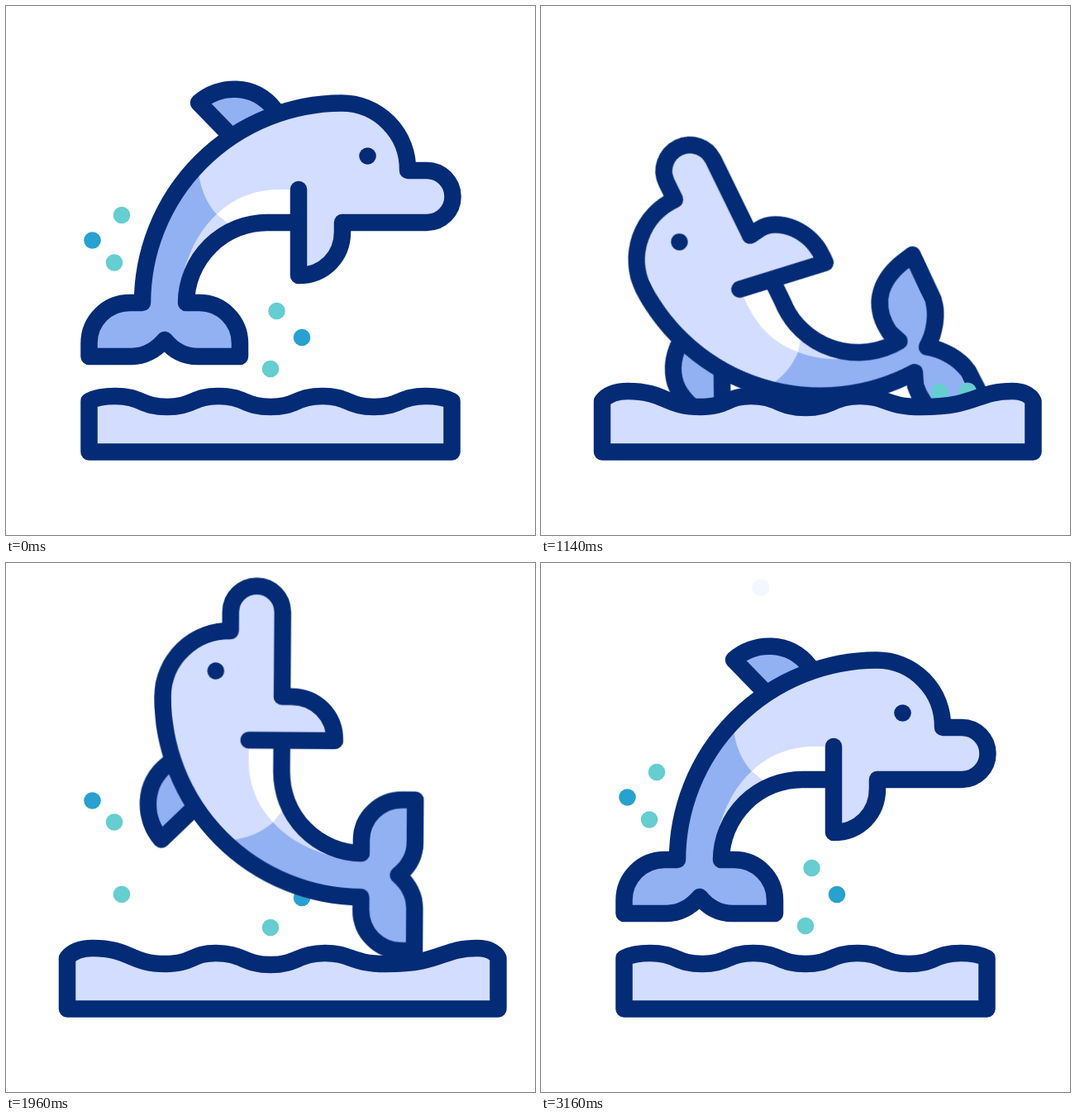
Write an HTML page without scripts that moves like this. It is 640 px wide and 640 px high and loops after 3.6 s.

```html
<!DOCTYPE html>
<html lang="en">
<head>
<meta charset="utf-8">
<title>Leaping dolphin</title>
<style>
html, body { margin: 0; width: 100%; height: 100%; overflow: hidden; background: #fff; }
svg { display: block; width: 100%; height: 100%; }

:root { --navy: #042b76; --pale: #d2ddff; --mid: #92b1f3; --teal: #66cdd1; --blue: #27a1cf; --sun: #ffcb50; }

svg * { animation: 3.6s linear infinite; }
.line { stroke: var(--navy); stroke-width: 20.5; stroke-linecap: round; stroke-linejoin: round; }
.pale { fill: var(--pale); }
.mid { fill: var(--mid); }
.trail { fill: none; stroke: var(--sun); stroke-width: 21; stroke-linecap: round; opacity: 0; }

/* leap: backflip, fall into the water, rock, rise again */
.dolphin { transform-origin: 320px 248.5px; animation-name: leap; }
@keyframes leap {
  0%, 7.78% { transform: none; animation-timing-function: cubic-bezier(.4, 0, .7, 1); }
  14.44% { transform: translate(-13px, -8.5px) rotate(-82.5deg); }
  22.78% { transform: translate(-13px, -4px) rotate(-89deg); animation-timing-function: ease-in; }
  31.67% { transform: translate(-41px, 113px) rotate(-115.6deg); animation-timing-function: ease-out; }
  38.89% { transform: translate(-8px, 140px) rotate(-185deg); animation-timing-function: ease-in-out; }
  47.22% { transform: translate(11.7px, 32.3px) rotate(-138.2deg); }
  54.44% { transform: translate(0, 0) rotate(-89.9deg); animation-timing-function: cubic-bezier(.3, .3, .5, 1); }
  64.44%, 100% { transform: none; }
}

/* fins and tail spread on impact */
.body { animation-name: spread; }
@keyframes spread {
  0%, 22.78%, 47.22%, 100% {
    d: path("M354 262L316 262A98 98 0 0 0 218 359L234 359C261 359 283 381 283 408L283 424L232 424C213 424 200 414 192 404C183 414 171 424 152 424L100.5 424L100.5 408C100.5 381 122 359 150 359L165 359A242 242 0 0 1 406 117.5A80 80 0 0 1 486 199L509 199A31.3 31.3 0 0 1 509 262L407 262");
  }
  31.67% {
    d: path("M354 262L316 262A98 98 0 0 0 213 368L228 362C272 356 292 385 298 418L300 428L240 427C222 424 203 411 192 395C181 411 162 424 144 427L84 428L86 418C92 385 112 356 156 362L171 368A242 242 0 0 1 406 117.5A80 80 0 0 1 486 199L509 199A31.3 31.3 0 0 1 509 262L407 262");
  }
}

.fin { animation-name: fin; }
@keyframes fin {
  0%, 22.78%, 47.22%, 100% { d: path("M354 222L354 326C385 326 407 303 407 273L407 262"); }
  31.67% { d: path("M354 222L337.5 329C383 333 412 300 409 276L407 262"); }
}

.dorsal { animation-name: dorsal; }
@keyframes dorsal {
  0%, 22.78%, 47.22%, 100% { d: path("M270 155L233 117C258 95 300 93 325 125"); }
  31.67% { d: path("M274 159L221 134C246 100 292 87 325 125"); }
}

.water { animation-name: swell; }
@keyframes swell {
  0%, 9.17%, 76.67%, 100% {
    d: path("M100.5 478C108 474 120 472 132 472C164 472 163 485 195 485C226 485 226 472 257 472C289 472 288 485 320 485C352 485 351 472 383 472C414 472 414 485 445 485C477 485 476 472 508 472C520 472 532 474 539.5 478L539.5 539.5L100.5 539.5Z");
    animation-timing-function: ease-in-out;
  }
  21.67%, 31.67%, 54.44%, 66.67% {
    d: path("M74 478C81 469 93 466 105 466C150 466 150 485 193 485C226 485 224 472 254 472C286 472 288 486 320 486C352 486 354 472 386 472C418 472 416 485 460 485C528 485 526 466 570 466C582 466 592 470 595.5 478L595.5 539.5L74 539.5Z");
    animation-timing-function: ease-in-out;
  }
  47.22% {
    d: path("M74 478C81 469 91 466 103 466C148 466 148 486 187 486C220 486 216 472 248 472C282 472 288 488 321 488C354 488 357 474 391 474C426 474 420 486 463 486C522 486 526 467 568 467C580 467 592 470 595.5 478L595.5 539.5L74 539.5Z");
    animation-timing-function: ease-in-out;
  }
}

/* droplets: up, under water, back out to rest */
.drops circle { animation-name: drop; }
@keyframes drop {
  0%, 7.78% { transform: none; animation-timing-function: ease-out; }
  14.44% { transform: translateY(var(--up)); }
  18% { transform: translateY(var(--up)); animation-timing-function: ease-in; }
  30%, 39% { transform: translateY(var(--deep)); }
  47.22% { transform: translateY(var(--a)); }
  54.44% { transform: translateY(var(--b)); }
  70.56% { transform: translateY(var(--c, 0px)); }
  75.56%, 100% { transform: none; }
}

.back { animation-name: back; }
@keyframes back {
  0%, 9% { opacity: 0; stroke-dasharray: 0 300; stroke-dashoffset: 0; }
  9.01% { opacity: 1; stroke-dasharray: 0 300; }
  14.44% { stroke-dasharray: 87 300; }
  16.67% { stroke-dasharray: 100 300; }
  18.5% { stroke-dasharray: 100 300; stroke-dashoffset: 0; }
  27.7% { opacity: 1; stroke-dashoffset: -99.9; }
  27.71%, 100% { opacity: 0; stroke-dasharray: 100 300; stroke-dashoffset: -99.9; }
}

.ahead { animation-name: ahead; }
@keyframes ahead {
  0%, 64% { opacity: 0; stroke-dasharray: 0 300; stroke-dashoffset: 0; }
  64.01% { opacity: 1; stroke-dasharray: 0 300; }
  70.56% { stroke-dasharray: 72.4 300; }
  73.33% { stroke-dasharray: 100 300; stroke-dashoffset: 0; }
  82.78% { stroke-dashoffset: -84; }
  85.5% { stroke: var(--sun); }
  87.7%, 100% { opacity: 1; stroke: #f4f7ff; stroke-dasharray: 100 300; stroke-dashoffset: -99.9; }
}

.splash path { stroke: var(--teal); animation-name: splash; animation-delay: var(--wait, 0s); }
@keyframes splash {
  0%, 30.5% { opacity: 0; stroke-dasharray: 4 300; stroke-dashoffset: 0; }
  30.51% { opacity: 1; stroke-dasharray: 4 300; stroke-dashoffset: 0; }
  31.67% { stroke-dasharray: 11 300; stroke-dashoffset: -5; }
  36.67% { stroke-dasharray: 28 300; stroke-dashoffset: -42; }
  41.67% { stroke-dasharray: 10 300; stroke-dashoffset: -90; }
  42.77% { opacity: 1; stroke-dasharray: 1 300; stroke-dashoffset: -99; }
  42.78%, 100% { opacity: 0; stroke-dasharray: 1 300; stroke-dashoffset: -99; }
}
</style>
</head>
<body>
<svg viewBox="0 0 640 640">
  <clipPath id="above"><path d="M-50-50H690V540H-50Z"/></clipPath>
  <clipPath id="skin"><path class="body"/></clipPath>

  <path class="trail back" pathLength="100" d="M208 30.5C130 30 75 75 53 167Q49 183 46.5 200"/>
  <path class="trail ahead" pathLength="100" d="M76 165C70 90 125 24 191 13C216 9 246 15 266 30"/>

  <g class="drops" fill="var(--teal)">
    <circle cx="140" cy="253" r="10.3" style="--up:-49px;--deep:262px;--a:198px;--b:148px;--c:35px"/>
    <circle cx="104.5" cy="283.5" r="10.3" fill="var(--blue)" style="--up:-55px;--deep:231px;--a:65px;--b:4px"/>
    <circle cx="131" cy="310.5" r="10.3" style="--up:-34px;--deep:205px;--a:48px;--b:3px"/>
    <circle cx="327.5" cy="369" r="10.3" style="--up:-36px;--deep:146px;--a:104px;--b:4px"/>
    <circle cx="358" cy="401" r="10.3" fill="var(--blue)" style="--up:-38px;--deep:114px;--a:53px;--b:4px"/>
    <circle cx="320" cy="439" r="10.3" style="--up:-34px;--deep:76px;--a:24px;--b:2px"/>
  </g>

  <g clip-path="url(#above)">
    <g class="dolphin">
      <path class="line mid dorsal"/>
      <path class="pale body"/>
      <g clip-path="url(#skin)">
        <path class="mid" d="M232 192C234 222 244 240 255 252C237 269 224 290 214 325V345H330V450H60V192Z"/>
      </g>
      <path class="pale" d="M255 252C237 269 224 290 214 325L230 318L268 272Z"/>
      <path fill="#fff" d="M354 222H330C300 222 273 234 255 252L275 268L354 262Z"/>
      <path class="line body" fill="none"/>
      <path class="line pale fin"/>
      <circle cx="437.5" cy="181.5" r="10.3" fill="var(--navy)"/>
    </g>
  </g>

  <g class="splash" transform="translate(384)">
    <path class="trail" pathLength="100" d="M100 500C100 420 70 355 15 327"/>
    <path class="trail" pathLength="100" d="M131 500C131 410 160 342 210 318"/>
  </g>
  <g class="splash" style="--wait:-3.4s">
    <path class="trail" pathLength="100" d="M100 500C100 420 70 355 15 327"/>
    <path class="trail" pathLength="100" d="M131 500C131 410 160 342 210 318"/>
  </g>

  <path class="line pale water"/>
</svg>
</body>
</html>
```
